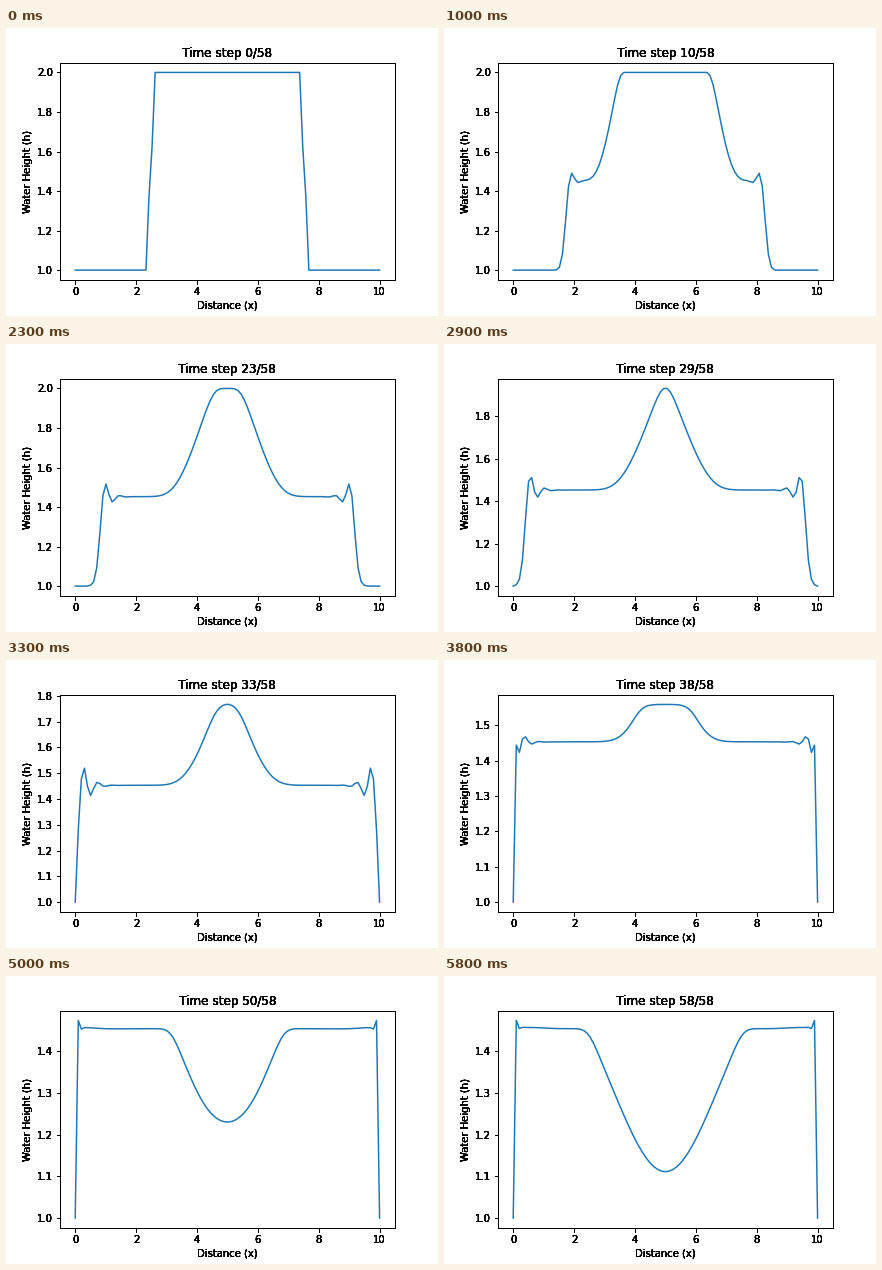
A matplotlib script for the animation above (5.9 s loop, 432 px wide and 288 px high).

```python
import numpy as np
import matplotlib.pyplot as plt
from matplotlib.animation import FuncAnimation

# Dam break: shallow water equations with a local Lax-Friedrichs flux
G = 9.81
LENGTH, CELLS = 10, 100
STEPS = 59
CFL = 0.75
INK_PASSES = 7

x = np.linspace(0, LENGTH, CELLS)


def flux(state):
    h, q = state
    return np.array([q, q ** 2 / h + 0.5 * G * h ** 2])


def advance(state, ratio):
    """One time step; the two end cells stay fixed."""
    left, right = state[:, :-1], state[:, 1:]
    speed = np.sqrt(G * np.maximum(left[0], right[0]))
    face = 0.5 * (flux(left) + flux(right)) - 0.5 * speed * (right - left)
    new = state.copy()
    new[:, 1:-1] -= ratio * np.diff(face, axis=1)
    return new


def simulate():
    h = np.where((x > 0.25 * LENGTH) & (x < 0.75 * LENGTH), 2.0, 1.0)
    state = np.array([h, np.zeros(CELLS)])
    ratio = CFL / np.sqrt(G * h.max())
    heights = []
    for _ in range(STEPS):
        state = advance(state, ratio)
        heights.append(state[0])
    return heights


def harden(artist):
    """Paint an artist several times so its soft edges turn solid."""
    draw = artist.draw

    def draw_solid(renderer):
        for _ in range(INK_PASSES):
            draw(renderer)

    artist.draw = draw_solid


heights = simulate()

plt.rcParams["font.family"] = "DejaVu Sans"
fig, ax = plt.subplots(figsize=(6, 4), dpi=72, facecolor="white")
fig.subplots_adjust(left=0.125, right=0.9, bottom=0.125, top=0.88)
line, = ax.plot(x, heights[0], color="#1f77b4", lw=1.5)
ax.set_xlabel("Distance (x)")
ax.set_ylabel("Water Height (h)")
for part in (ax.xaxis, ax.yaxis, ax.title, *ax.spines.values()):
    harden(part)


def update(step):
    line.set_ydata(heights[step])
    ax.relim()
    ax.autoscale_view()
    ax.set_title(f"Time step {step}/{STEPS - 1}")
    return line,


anim = FuncAnimation(fig, update, frames=STEPS, interval=100,
                     repeat=True, repeat_delay=0, blit=False)
plt.show()
```
